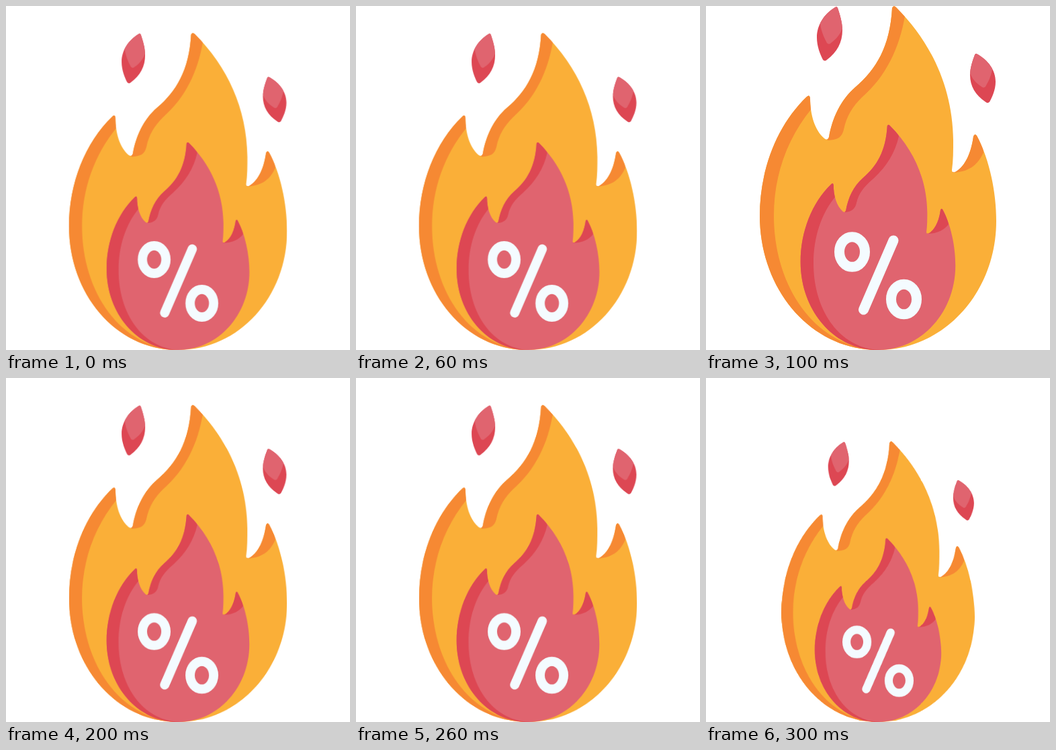
An HTML page without scripts that plays this animation: 512 px wide and 512 px high, repeating every 400 ms.

```html
<!DOCTYPE html>
<html lang="en">
<head>
<meta charset="utf-8">
<title>Hot discount</title>
<style>
  html, body { margin: 0; width: 100%; height: 100%; overflow: hidden; background: #fff; }
  svg { display: block; width: 100%; height: 100%; }
  .amber { fill: #faaf38; }
  .orange { fill: #f68933; }
  .rose { fill: #e0646f; }
  .red { fill: #dd4753; }
  .sign { fill: none; stroke: #f4fbff; stroke-width: 15; stroke-linecap: round; }

  /* the whole flame jumps between three sizes, rooted at its base */
  .fire { transform-origin: 256px 512px; animation: flicker 400ms step-end infinite; }
  @keyframes flicker {
    0%, 50% { transform: scale(.922); }
    25% { transform: scale(1); }
    75%, 100% { transform: scale(.816); }
  }
</style>
</head>
<body>
<svg viewBox="0 0 512 512">
  <defs>
    <path id="flame" d="M283 2C336 55 367 122 368 200C368 215 368 230 366 244Q366 249 371 247
      C387 238 395 216 398 194Q400 189 403 193C421 226 432 275 432 320C432 426 355 512 256 512
      C156 512 80 422 80 312C80 243 106 177 150 135Q154 131 155 137C155 162 162 185 176 197
      Q181 201 183 195C188 167 200 140 222 121C253 95 274 60 277 3Q279 -2 283 2Z"/>
    <clipPath id="outer"><use href="#flame"/></clipPath>
    <clipPath id="inner"><use href="#flame" transform="translate(88.3 176.6) scale(.655)"/></clipPath>

    <path id="ember" d="M192 2C176 12 165 28 165 47C165 60 170 72 174 80Q177 83 180 80
      C195 69 203 54 203 36C203 24 199 12 196 3Q195 0 192 2Z"/>
    <clipPath id="emberClip"><use href="#ember"/></clipPath>
    <g id="spark">
      <use href="#ember" class="red"/>
      <path class="rose" clip-path="url(#emberClip)"
        d="M170 27C172 40 177 49 180 55Q183 58 186 55C196 48 201 40 204 30V0H170Z"/>
    </g>
  </defs>

  <g class="fire">
    <use href="#spark"/>
    <use href="#spark" transform="translate(596 70) scale(-1 .91)"/>

    <use href="#flame" class="amber"/>
    <g class="orange" clip-path="url(#outer)">
      <path d="M140 120L155 130L157 153C122 196 101 250 101 312C101 420 165 512 262 512H60V150Z"/>
      <path d="M181 200C196 199 202 196 205 184C209 164 218 150 232 136C268 105 288 62 296 15L297 10L280 -5H250L178 150V190Z"/>
      <path d="M367 248L374 225L396 185L410 190L413 218C404 238 390 247 367 248Z"/>
    </g>

    <use href="#flame" class="rose" transform="translate(88.3 176.6) scale(.655)"/>
    <g class="red" clip-path="url(#inner)">
      <path d="M178 255L189 262L194 282C171 309 160 345 160 383C160 455 201 512 262 512H120V270Z"/>
      <path d="M207 307C217 306 222 302 224 293C227 279 235 269 248 258C268 240 281 220 287 194L280 175H260L204 280V300Z"/>
      <path d="M329 339L334 325L346 298L358 300L361 325C354 334 343 339 329 339Z"/>
    </g>

    <g class="sign">
      <ellipse cx="217.5" cy="366" rx="19" ry="22.3"/>
      <ellipse cx="294.5" cy="436.5" rx="19" ry="22.3"/>
      <path d="M279 349L234.5 452"/>
    </g>
  </g>
</svg>
</body>
</html>
```
